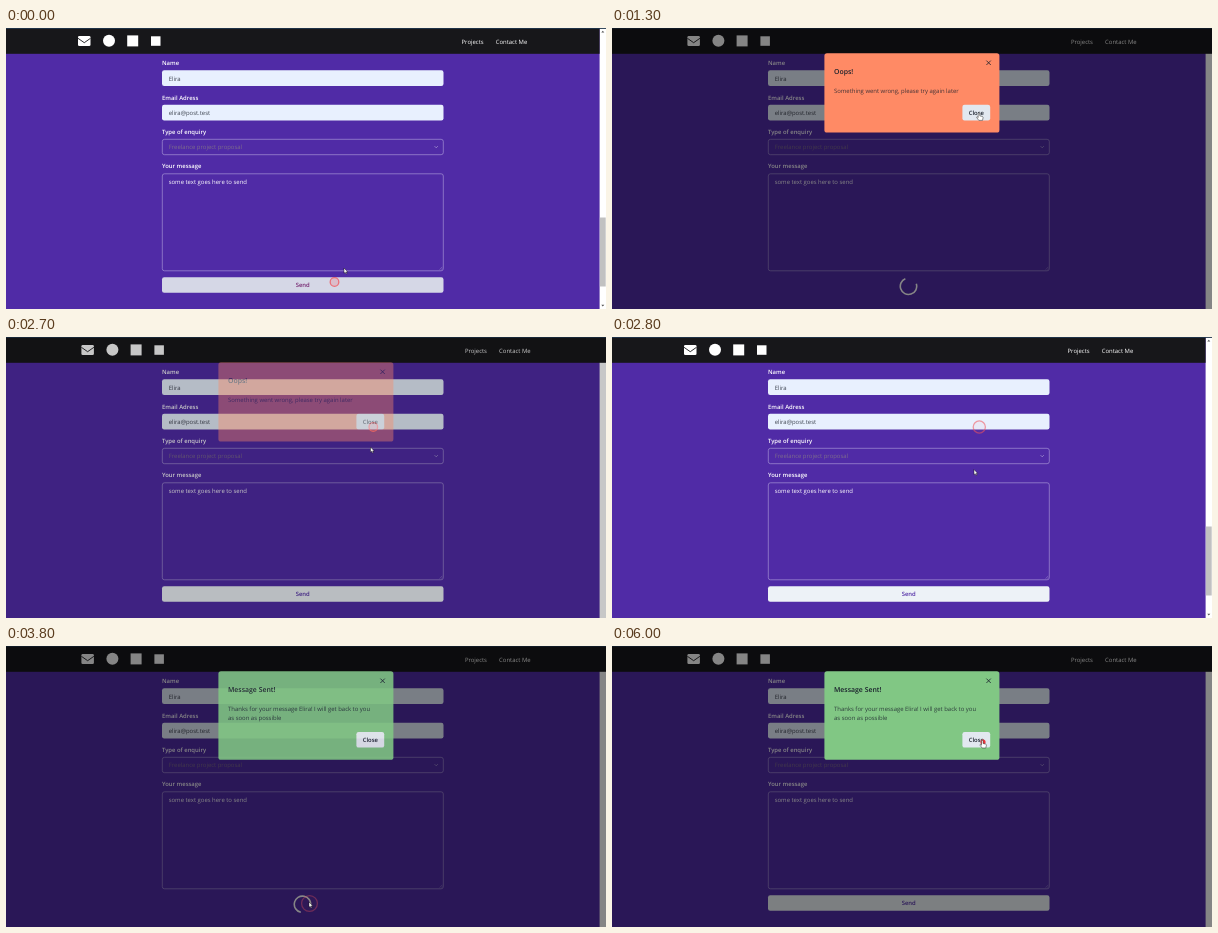
An HTML page that plays this animation: 600x281 px, repeating every 6100 ms.

```html
<!DOCTYPE html>
<html lang="en">
<head>
<meta charset="utf-8">
<title>Contact form</title>
<style>
  html, body { margin: 0; width: 100%; height: 100%; overflow: hidden; background: #502ba6; }
  svg { display: block; width: 100%; height: 100%; }
  text { font: 400 5.95px "Open Sans", "Noto Sans", sans-serif; text-rendering: geometricPrecision; }
  .semi { font-weight: 600; font-size: 5.9px; }
  .title { font-weight: 600; font-size: 6.9px; }
  .white { fill: #fff; }
  .ink { fill: #1a202c; }
  .soft { fill: #1a202c; opacity: .82; }
  .mid { text-anchor: middle; }
  .auto { fill: #e8f0fe; }
  .box { fill: none; stroke: #b3a3dc; stroke-width: .6; }
</style>
</head>
<body>
<svg viewBox="0 0 600 281">
  <rect width="600" height="281" fill="#502ba6"/>

  <g class="semi white">
    <text class="semi" x="156" y="37.2">Name</text>
    <text class="semi" x="156" y="71.5">Email Adress</text>
    <text class="semi" x="156" y="106">Type of enquiry</text>
    <text class="semi" x="156" y="140.3">Your message</text>
  </g>
  <rect class="auto" x="156" y="42.2" width="281.5" height="15.8" rx="2.2"/>
  <rect class="auto" x="156" y="76.7" width="281.5" height="15.8" rx="2.2"/>
  <rect class="box" x="156.3" y="111.3" width="281" height="15.4" rx="2.2"/>
  <rect class="box" x="156.3" y="145.8" width="281" height="97" rx="2.2"/>
  <text class="soft" x="162.7" y="52.6">Elira</text>
  <text class="soft" x="162.7" y="87">elira@post.test</text>
  <text x="162.7" y="121.2" fill="#7d6c8c">Freelance project proposal</text>
  <text class="white" x="162.7" y="155.9">some text goes here to send</text>
  <path d="M428.6 118.2l1.6 1.6 1.6-1.6" fill="none" stroke="#a796d4" stroke-width=".8"/>
  <path d="M433.6 241.6l2.8-2.8M435.2 241.6l1.2-1.2" stroke="#b3a3dc" stroke-width=".4"/>

  <g id="send">
    <rect id="sendFill" x="156" y="249.2" width="281.5" height="15.6" rx="2.2"/>
    <text class="semi mid" id="sendText" x="296.7" y="259.2">Send</text>
  </g>
  <circle id="spinner" cx="296.5" cy="258.3" r="8.2" fill="none" stroke="#fff" stroke-width="1.6" pathLength="360" stroke-dasharray="265 95"/>

  <rect x="593.6" width="6.4" height="281" fill="#fff"/>
  <g id="bar">
    <rect x="593.9" y="189.5" width="5.8" height="69" fill="#c1c1c1"/>
    <path d="M595.3 4.4l1.5-1.7 1.5 1.7zM595.3 276.8l1.5 1.7 1.5-1.7z" fill="#555"/>
  </g>

  <rect id="nav" height="25.8" fill="#17171a"/>
  <g id="links" class="white">
    <rect x="72" y="8" width="12.5" height="10" rx="1.3"/>
    <path d="M72 10.3l6.25 4.4 6.25-4.4" fill="none" stroke="#17171a" stroke-width=".9"/>
    <circle cx="103" cy="12.8" r="6"/>
    <rect x="121.2" y="7.4" width="11" height="11"/>
    <rect x="145" y="8.3" width="9.5" height="9.5"/>
    <text x="455.5" y="15.6">Projects</text>
    <text x="489.7" y="15.6">Contact Me</text>
  </g>
  <rect width="600" height=".9" fill="#20364c"/>

  <rect id="shade" width="600" height="281" opacity="0"/>
  <circle id="ring" stroke="#f2545b" stroke-width="1.3" fill="#f2545b"/>

  <g id="modal">
    <rect id="panel" x="212.4" y="25.2" width="175" rx="2.6"/>
    <text class="title ink" id="title" x="222" y="45.6"></text>
    <text class="soft" id="line1" x="222" y="65"></text>
    <text class="soft" id="line2" x="222" y="74.4"></text>
    <path d="M374.4 32.6l4.4 4.4M378.8 32.6l-4.4 4.4" stroke="#1a202c" stroke-width=".8"/>
    <g id="close">
      <rect id="closeFill" x="350.4" y="76.8" width="27.8" height="15.6" rx="2.2"/>
      <text class="semi mid ink" x="364.3" y="86.8">Close</text>
    </g>
  </g>

  <circle id="tap" fill="#f0343c" r="2.6"/>
  <g id="cursor" fill="#fff" stroke="#111" stroke-width=".45" stroke-linejoin="round">
    <path id="arrow" d="M0 0V5.2L1.2 4.2 2 6 2.9 5.6 2.1 3.9H3.7Z"/>
    <path id="hand" d="M-.8.6a.8.8 0 0 1 1.6 0V3l2.6.6q.8.3.7 1.2L3.5 7.5H-.2L-2.2 4.8q-.3-1 .5-.9l.9.8Z"/>
  </g>
</svg>
<script>
const LOOP = 6100, STEP = 100;
const el = {};
document.querySelectorAll('[id]').forEach(n => el[n.id] = n);

// All times below are in steps of 100 ms.
const path = [
  [0, 338, 240], [2, 343.6, 145.5], [4, 356, 112], [7, 365, 90], [10, 367, 85], [15, 367, 84.8],
  [19, 367, 87.5], [26, 367, 87.5], [28, 362, 132.5], [30, 345, 195], [33, 305, 254],
  [35, 303, 256], [42, 303, 256], [45, 330, 190], [49, 368, 108], [52, 370, 96], [56, 370.3, 94.5], [60, 370.3, 94.5]
];
const clicks = [[-1, 328.5, 254], [26, 367.3, 90], [35, 303.5, 257.5], [60, 371, 96]];
const dialogs = [
  { from: 1, to: 27, fade: { 1: .5, 27: .4 }, fill: '#ff8a65', height: 79.3, drop: 0, title: 'Oops!',
    lines: ['Something went wrong, please try again later', ''] },
  { from: 37, to: 60, fade: { 37: .35, 38: .88 }, fill: '#81c784', height: 88.6, drop: 9.2, title: 'Message Sent!',
    lines: ['Thanks for your message Elira! I will get back to you', 'as soon as possible'] }
];
const spins = [{ from: 1, to: 19, gap: 55 }, { from: 37, to: 56, gap: -25 }];

const set = (n, attrs) => { for (const k in attrs) n.setAttribute(k, attrs[k]); };
const show = (n, on) => n.style.display = on ? '' : 'none';
const within = (s, a, b) => s >= a && s <= b;
const active = (list, s) => list.find(d => within(s, d.from, d.to));

function cursorAt(s) {
  const i = Math.max(1, path.findIndex(p => p[0] >= s));
  const [a, x, y] = path[i - 1], [b, u, v] = path[i];
  const k = (s - a) / (b - a);
  return [x + (u - x) * k, y + (v - y) * k];
}

function drawDialog(s) {
  const d = active(dialogs, s);
  show(el.modal, d);
  show(el.bar, !d);
  set(el.nav, { width: d ? 600 : 593.6 });
  set(el.links, { transform: `translate(${d ? 3.4 : 0})` });
  const alpha = d ? d.fade[s] ?? 1 : 0;
  set(el.shade, { opacity: .48 * Math.min(1, alpha * 1.14) });
  if (!d) return;
  set(el.modal, { opacity: alpha });
  set(el.panel, { fill: d.fill, height: d.height });
  set(el.close, { transform: `translate(0 ${d.drop})` });
  el.title.textContent = d.title;
  el.line1.textContent = d.lines[0];
  el.line2.textContent = d.lines[1];
}

function drawClick(s) {
  const c = clicks.find(c => within(s - c[0], 0, 3));
  show(el.ring, c);
  show(el.tap, c && c[0] === s);
  if (!c) return;
  const age = s - c[0], at = { cx: c[1], cy: c[2] };
  set(el.ring, { ...at, r: 2.5 + 1.8 * age, opacity: 1 - .22 * age, 'fill-opacity': age < 2 ? .25 : .08 });
  set(el.tap, at);
}

function draw(s) {
  drawDialog(s);
  drawClick(s);

  const spin = active(spins, s);
  show(el.spinner, spin);
  show(el.send, !spin);
  if (spin) set(el.spinner, { transform: `rotate(${spin.gap + 47 + 80 * (s - spin.from)} 296.5 258.3)` });

  const overSend = s === 0 || within(s, 33, 36), overClose = within(s, 7, 26) || s >= 51;
  set(el.sendFill, { fill: overSend ? '#d5d7e6' : '#edf2f7' });
  set(el.sendText, { fill: overSend ? '#74246f' : '#502ba6' });
  set(el.closeFill, { fill: overClose ? '#e2e8f0' : '#edf2f7' });

  const hand = overClose || within(s, 33, 36);
  show(el.hand, hand);
  show(el.arrow, !hand);
  set(el.cursor, { transform: `translate(${cursorAt(s)})` });
}

const start = performance.now();
let last = -1;
function tick() {
  const s = Math.floor((performance.now() - start) % LOOP / STEP);
  if (s !== last) draw(last = s);
  requestAnimationFrame(tick);
}
tick();
</script>
</body>
</html>
```
